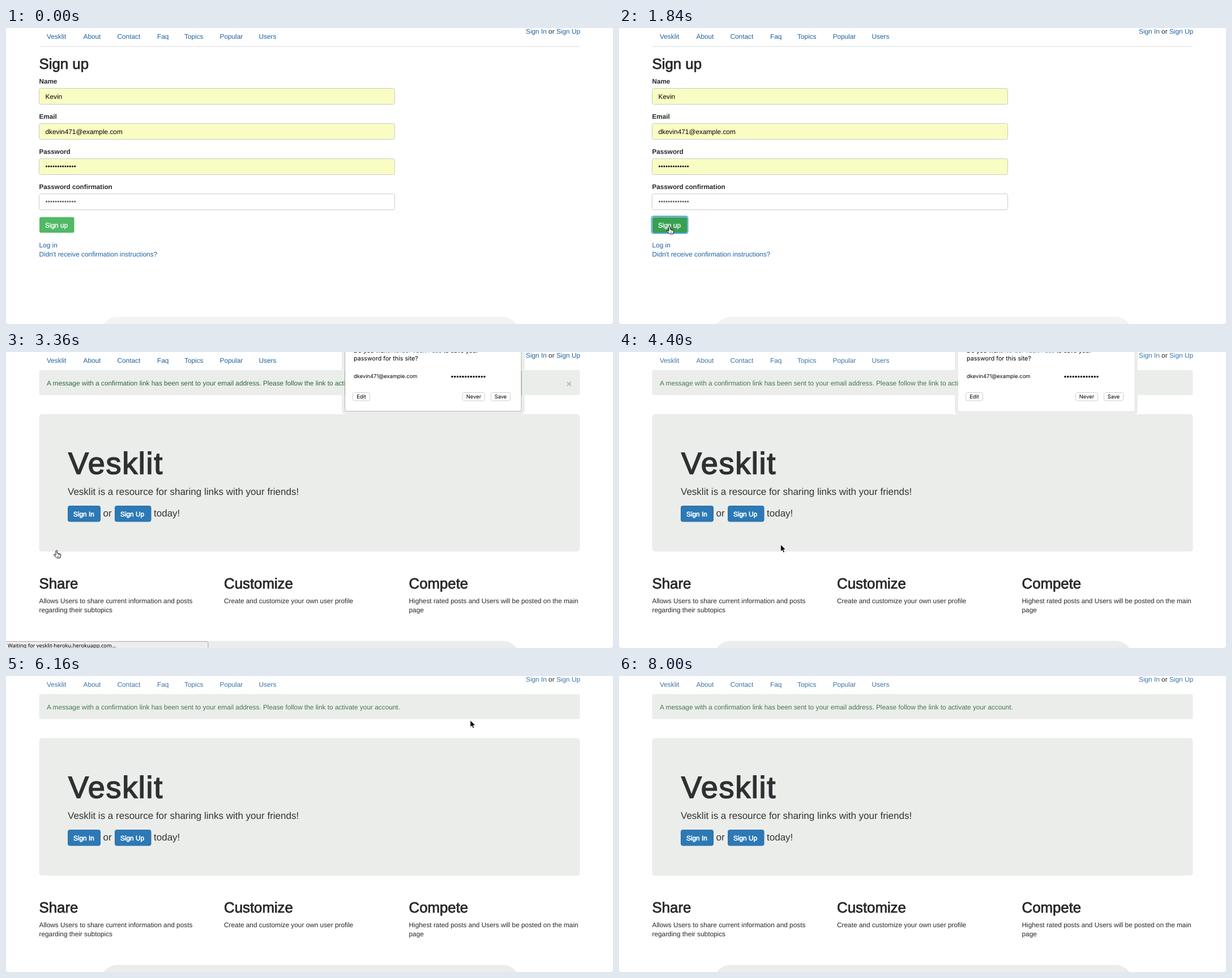
Animation of 1072 by 522 pixels, one loop 8320 ms. Source, as an HTML page:

```html
<!DOCTYPE html>
<html lang="en">
<head>
<meta charset="utf-8">
<title>Sign up</title>
<style>
html, body { margin: 0; width: 100%; height: 100%; overflow: hidden; background: #fff; }
svg { display: block; width: 1072px; height: 522px; font: 11.83px "Liberation Sans", Arial, sans-serif; text-rendering: geometricPrecision; }
text { fill: #26282a; white-space: pre; }
.link { fill: #1f619d; }
.label { font-weight: bold; font-size: 11.7px; }
.head { font-size: 25.8px; stroke: #26282a; stroke-width: .8px; }
.title { font-size: 54px; letter-spacing: 1.7px; fill: #2e3032; stroke: #2e3032; stroke-width: 1.6px; }
.lead { font-size: 17px; fill: #333; }
.btn { fill: #fff; stroke: #fff; stroke-width: .35px; }
.blue .btn { stroke-width: .6px; }
.blue rect { fill: #2c79b5; stroke: #2a70aa; }
.value { fill: #000; }
.field { fill: #f9fdc3; stroke: #c9cbc8; }
.gray { fill: #ebedeb; }
.dots { fill: none; stroke-linecap: round; }
.alert { fill: #2d6a38; }
.ask { font: 10.7px Inter, sans-serif; fill: #000; }
.small { font: 9.4px Inter, sans-serif; fill: #000; }
.key { fill: #fff; stroke: #cfcfcf; }
.status { font: 9.3px "Noto Sans", sans-serif; fill: #000; }
.pale .link, .pale .alert { opacity: .88; }
.popup { opacity: var(--popup); }
</style>
</head>
<body>
<svg id="stage" viewBox="0 0 1072 522">
  <rect id="footer" x="167" y="509.5" width="740" height="60" rx="30"/>
  <path d="M0 519q0 3 3 3H0zM1072 519q0 3-3 3h3z" fill="#bbb"/>
  <g id="nav"></g>
  <text x="918" y="10"><tspan class="link">Sign In</tspan> or <tspan class="link">Sign Up</tspan></text>

  <g id="form">
    <path d="M59 32.5H1013" stroke="#dcdcdc"/>
    <text class="head" x="58.5" y="72">Sign up</text>
    <g id="fields"></g>
    <text class="value" x="69.5" y="125">Kevin</text>
    <text class="value" x="69.5" y="187">dkevin471@example.com</text>
    <path class="dots" d="M71.5 244H122" stroke="#000" stroke-width="3" stroke-dasharray="0 4.17"/>
    <path class="dots" d="M71.5 306H122" stroke="#555" stroke-width="3" stroke-dasharray="0 4.17"/>
    <rect id="ring" x="57.5" y="332" width="64" height="30" rx="3.5" fill="none" stroke="#5ba3ec" stroke-width="2"/>
    <rect id="submit" x="59" y="333.5" width="61.5" height="27.5" rx="3"/>
    <text class="btn" x="69" y="351.5">Sign up</text>
    <text class="link" x="58.5" y="386.5">Log in</text>
    <text class="link" x="58.5" y="403">Didn't receive confirmation instructions?</text>
  </g>

  <g id="home">
    <rect class="gray" x="58.5" y="32" width="955" height="44" rx="3.3"/>
    <rect class="gray" x="58.5" y="109.5" width="955" height="242.5" rx="5"/>
    <rect class="gray popup" x="593" y="-10" width="323" height="120" rx="7"/>
    <text class="alert" x="72" y="58.7">A message with a confirmation link has been sent to your email address. Please follow the link to activate your account.</text>
    <text class="title" x="110" y="215">Vesklit</text>
    <text class="lead" x="109" y="251.5">Vesklit is a resource for sharing links with your friends!</text>
    <g class="blue">
      <rect x="109.5" y="271.5" width="57" height="27.5" rx="3"/>
      <rect x="192.5" y="271.5" width="63.5" height="27.5" rx="3"/>
      <text class="btn" x="119" y="289.5">Sign In</text>
      <text class="btn" x="202" y="289.5">Sign Up</text>
    </g>
    <text class="lead" x="171.5" y="289.5">or</text>
    <text class="lead" x="261" y="289.5">today!</text>
    <g id="columns"></g>
    <text id="close" x="989.5" y="62" style="font:bold 17px 'Liberation Sans',sans-serif;fill:#b9bbb8">×</text>
    <g class="popup">
      <rect x="599" y="-10" width="311" height="114" rx="3" fill="#fff"/>
      <g id="edge" fill="none">
        <rect x="598.5" y="-10" width="311.5" height="114.5" rx="3" stroke="#b4b4b4"/>
        <path d="M598.5 33V76M910.5 33V76" stroke="#86a788"/>
      </g>
      <text class="ask" x="614" y="1">Do you want <tspan class="link">Nordel Vault Pass</tspan> to save your</text>
      <text class="ask" x="614" y="15">password for this site?</text>
      <text class="small" x="614" y="46">dkevin471@example.com</text>
      <path class="dots" d="M788 43.5H846" stroke="#000" stroke-width="3.5" stroke-dasharray="0 4.75"/>
      <g id="keys"></g>
    </g>
  </g>

  <g id="status">
    <path d="M-1 510.5H354q3 0 3 3V523H-1z" fill="#ededed" stroke="#adadad"/>
    <text class="status" x="3" y="520.5">Waiting for vesklit-heroku.herokuapp.com...</text>
  </g>
  <g id="cursor" stroke-linejoin="round">
    <path id="arrow" d="M0 0V12.3L2.8 9.8 4.8 14.2 6.9 13.3 5 9H8.8Z" fill="#000" stroke="#fff" stroke-width=".8"/>
    <g id="hand">
      <path d="M-2 1.2q1.3-2 2.6 0V5.5l4 .8q2.3.6 2.2 2.6l-1.2 4.8h-6L-5.6 8.6q.4-1.8 2-.9L-2 9Z" fill="#fff" stroke="#000"/>
      <path d="M2.6 6V8.5M4.6 6.5V9M1 10V12M3 10V12" stroke="#000" stroke-width=".7"/>
    </g>
  </g>
</svg>
<script>
const LOOP = 8320, STEP = 80, LOADED = 3360;
const $ = id => document.getElementById(id);
const text = (x, y, s, cls = "") => `<text class="${cls}" x="${x}" y="${y}">${s}</text>`;

$("nav").innerHTML = [[72, "Vesklit"], [136.5, "About"], [196.5, "Contact"], [267, "Faq"],
  [315, "Topics"], [377.5, "Popular"], [446.5, "Users"]]
  .map(([x, s]) => text(x, 19, s, "link")).join("");

$("fields").innerHTML = ["Name", "Email", "Password", "Password confirmation"]
  .map((s, i) => text(58.5, 98 + 62 * i, s, "label") +
    `<rect class="field" x="58.5" y="${106.5 + 62 * i}" width="628" height="28" rx="3"
      ${i == 3 ? 'style="fill:#fff"' : ""}/>`).join("");

$("columns").innerHTML = [
  [58.5, "Share", "Allows Users to share current information and posts", "regarding their subtopics"],
  [385, "Customize", "Create and customize your own user profile", ""],
  [711.5, "Compete", "Highest rated posts and Users will be posted on the main", "page"]]
  .map(([x, head, a, b]) => text(x, 416.5, head, "head") + text(x, 442.5, a) + text(x, 459.3, b)).join("");

$("keys").innerHTML = [[612.5, 30, "Edit"], [806.5, 39, "Never"], [856.5, 34, "Save"]]
  .map(([x, w, s]) => `<rect class="key" x="${x}" y="71.5" width="${w}" height="14.5" rx="3"/>` +
    `<text class="small" text-anchor="middle" x="${x + w / 2}" y="82">${s}</text>`).join("");

// Pointer path: time, x, y
const path = [
  [0, 330, -20], [240, 305, 70], [400, 305, 70], [800, 112, 348], [880, 106, 350],
  [960, 106, 350], [1120, 98, 351], [1200, 98, 351], [1520, 90, 349.5], [4080, 90, 349.5],
  [4560, 354, 336], [4720, 354, 336], [5120, 643, 208], [5280, 643, 208],
  [5680, 803, 83], [5840, 820, 78], [6160, 820, 78], [6640, 606, 104], [6960, 606, 104],
  [7440, 573, 89], [7520, 573, 89], [8000, 584, -20], [LOOP, 584, -20]];

const clamp = v => Math.max(0, Math.min(1, v));
const show = (id, on) => $(id).style.display = on ? "" : "none";

function pointer(t) {
  const i = path.findIndex(p => p[0] > t);
  const [t0, x0, y0] = path[i - 1], [t1, x1, y1] = path[i];
  const u = (t - t0) / (t1 - t0), k = u * u * (3 - 2 * u);
  return [x0 + (x1 - x0) * k, y0 + (y1 - y0) * k];
}

function draw(now) {
  const t = Math.floor(now % LOOP / STEP) * STEP;
  const home = t >= LOADED, fresh = t < LOADED + STEP;
  show("form", !home);
  show("home", home);
  show("close", fresh);
  show("edge", fresh);
  $("stage").classList.toggle("pale", !fresh);
  $("stage").style.setProperty("--popup", 1 - clamp((t - 5920) / 240));
  $("footer").setAttribute("fill", home ? "#ebedeb" : "#f3f3f3");
  show("ring", t >= 1840);
  $("submit").setAttribute("fill", t < 880 ? "#50b967" : "#38a052");
  $("status").style.opacity = clamp((t - 2400) / 160) * (1 - clamp((t - 3520) / 240));

  const hand = t >= 880 && t < 4160;
  show("hand", hand);
  show("arrow", !hand);
  $("cursor").setAttribute("transform", `translate(${pointer(t)})`);
}

(function tick() {
  draw(performance.now());
  requestAnimationFrame(tick);
})();
</script>
</body>
</html>
```
